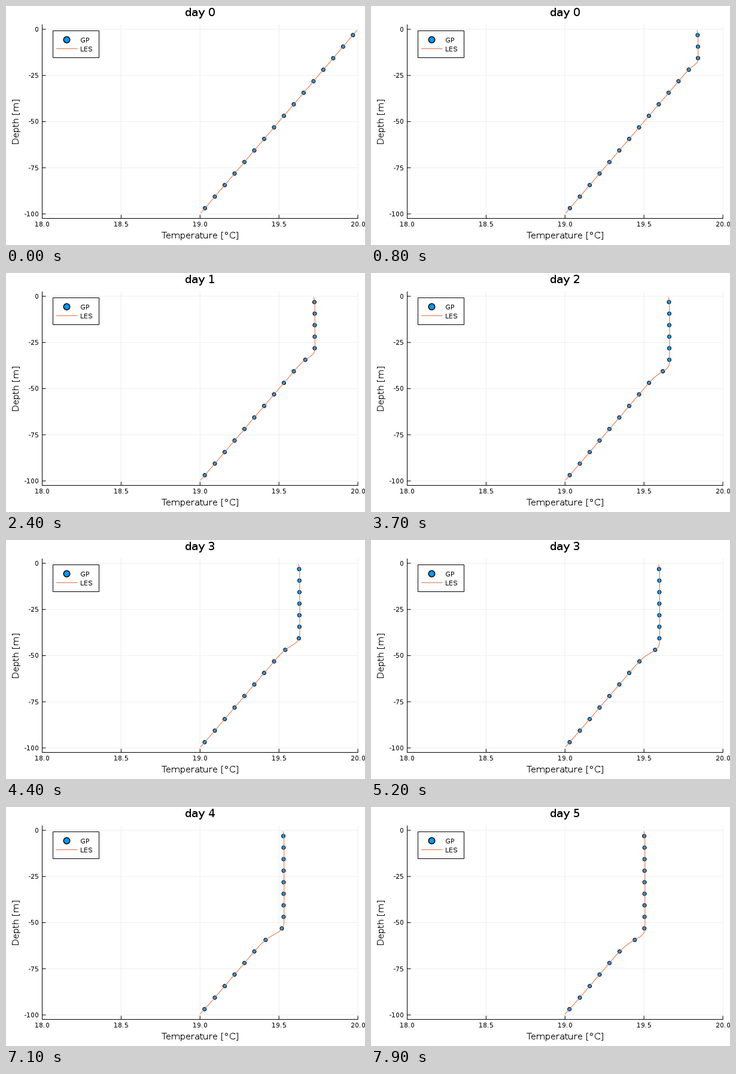
Recreate the animation shown at these times as a matplotlib script. Size 600 px wide and 400 px high, loop 8000 ms.

```python
import numpy as np
import matplotlib.pyplot as plt
from matplotlib.animation import FuncAnimation

W, H, DPI = 600, 400, 100
FRAMES, STEP_MS = 80, 100
FRAMES_PER_DAY = 14.4
BLUE, ORANGE, GRID = "#009afa", "#e26f46", "#eeeeee"
PX = 72 / DPI  # points per pixel

LEFT, RIGHT, TOP, BOTTOM = 60.5, 588.5, 31.0, 355.5

plt.rcParams.update({"font.family": "DejaVu Sans", "path.snap": False,
                     "text.hinting": "native", "text.hinting_factor": 1})


def to_x(temp):
    return LEFT + (temp - 18) * 263.8


def to_y(z):
    return 39.0 - 3.09 * z


def profile(z, n):
    """Temperature and mixing weight at depth z after n output steps."""
    root = np.sqrt(n)
    line = 20 + 0.01 * z
    mixed = 20 - 0.0555 * root
    scale = 0.8 + 0.09 * root
    weight = (n > 0) / (1 + np.exp(-(z + 6.58 * root) / scale))
    skin = 0.0095 * np.exp(z / 2) * (n > 0)
    floor = 0.005 * n / FRAMES * np.exp(-((z + 100) / 5) ** 2)
    return line + (mixed - line) * weight - skin - floor, weight


fig = plt.figure(figsize=(W / DPI, H / DPI), dpi=DPI, facecolor="white")
ax = fig.add_axes([0, 0, 1, 1])
ax.set_xlim(0, W)
ax.set_ylim(H, 0)
ax.axis("off")


def stroke(xs, ys, color="black", z=3):
    return ax.plot(xs, ys, color=color, lw=PX, zorder=z,
                   solid_capstyle="butt")[0]


def label(x, y, s, px=11, ha="center", **kw):
    return ax.text(x, y, s, fontsize=px * PX, ha=ha, va="baseline",
                   zorder=8, **kw)


def dot(x, y, r, edge, z):
    return ax.add_patch(plt.Circle((x, y), r, fc=BLUE, ec="black",
                                   lw=edge * PX, zorder=z))


# grid, ticks and axes
for t in np.arange(18, 20.1, 0.5):
    x = to_x(t)
    stroke([x, x], [TOP, BOTTOM], GRID, 1)
    stroke([x, x], [BOTTOM, BOTTOM - 6])
    label(x, 369, f"{t:.1f}")
for z in range(0, -101, -25):
    y = to_y(z)
    stroke([LEFT, RIGHT], [y, y], GRID, 1)
    stroke([LEFT, LEFT + 6], [y, y])
    label(54.8, y + 3.9, str(z), ha="right")
stroke([LEFT, LEFT], [TOP, BOTTOM + 0.5])
stroke([LEFT - 0.5, RIGHT], [BOTTOM, BOTTOM])

title = label(324.5, 17.2, "day 0", 19)
label(324.3, 389, "Temperature [°C]", 15)
label(22.3, 193, "Depth [m]", 15, rotation=90, rotation_mode="anchor")

# legend
ax.add_patch(plt.Rectangle((78.5, 41.5), 77, 45, fc="white", ec="black",
                           lw=PX, zorder=6))
dot(101.5, 56.5, 5.2, 1.5, 7)
stroke([84, 119.5], [71.5, 71.5], ORANGE, 7)
label(124.3, 60.6, "GP", ha="left")
label(124.3, 75.6, "LES", ha="left")

z_les = np.linspace(-99.5, -0.5, 199)
z_gp = -3.125 - 6.25 * np.arange(16)
les = stroke([], [], ORANGE, 5)
gp = [dot(0, to_y(z), 3, 1, 4) for z in z_gp]


def update(n):
    temp, _ = profile(z_les, n)
    les.set_data(to_x(temp), to_y(z_les))
    temp, weight = profile(z_gp, n)
    temp = temp - 0.003 * np.sqrt(n / FRAMES) * weight
    for d, t, z in zip(gp, temp, z_gp):
        d.center = to_x(t), to_y(z)
    title.set_text(f"day {int(n / FRAMES_PER_DAY)}")
    return [les, title, *gp]


anim = FuncAnimation(fig, update, frames=FRAMES, interval=STEP_MS,
                     init_func=lambda: update(0), repeat=True, repeat_delay=0)
plt.show()
```
